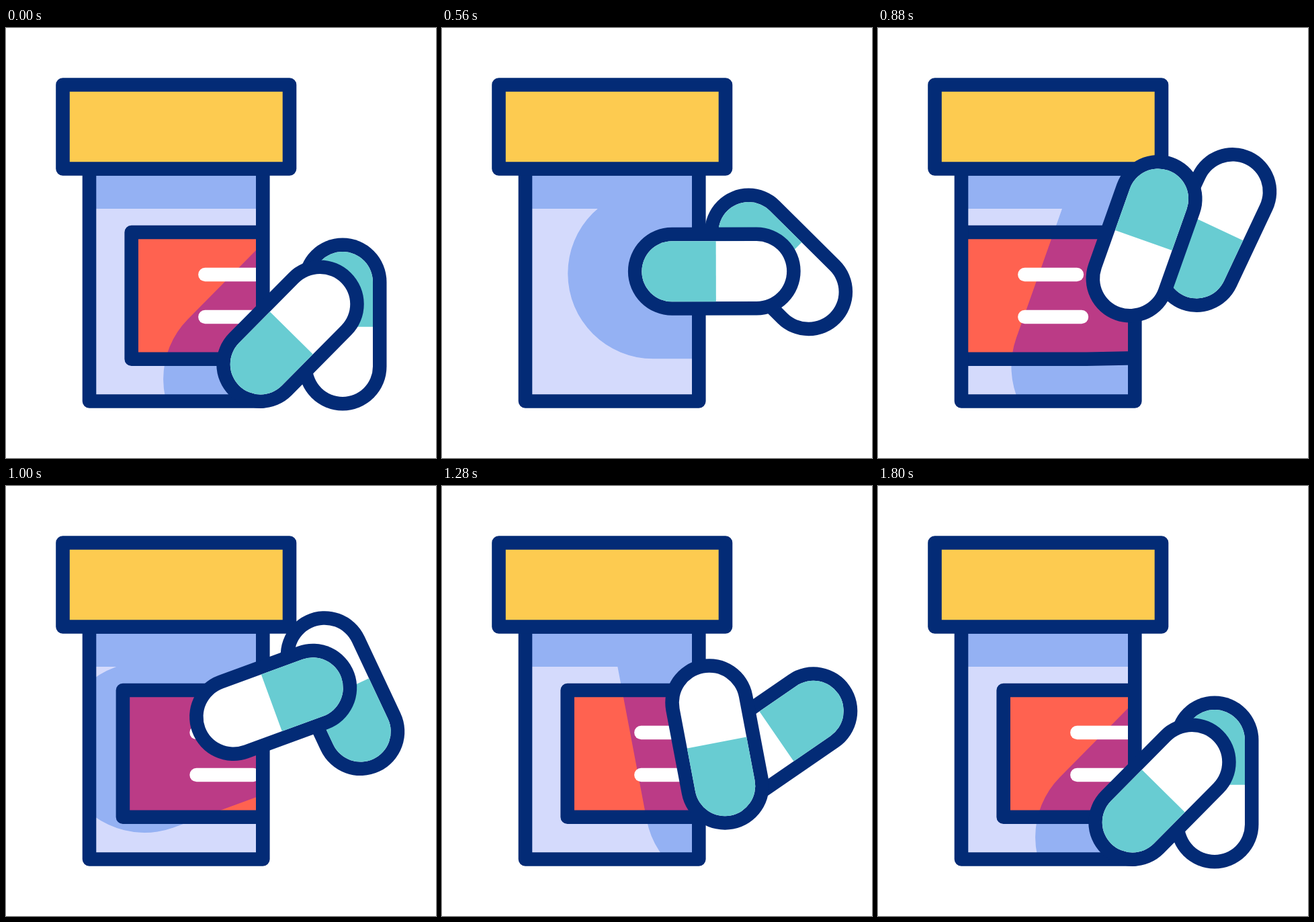
An HTML page with a canvas that plays this animation: 640x640 px, repeating every 2000 ms.

```html
<!DOCTYPE html>
<html lang="en">
<head>
<meta charset="utf-8">
<title>Pill bottle</title>
<style>
  html, body { margin: 0; width: 100%; height: 100%; overflow: hidden; background: #fff; }
  canvas { display: block; width: 640px; height: 640px; }
</style>
</head>
<body>
<canvas id="stage" width="640" height="640"></canvas>
<script>
const ctx = document.getElementById('stage').getContext('2d');
const NAVY = '#032b76', YELLOW = '#fdcb50', RED = '#ff6250', PURPLE = '#bb3b86';
const LIGHT = '#d4dafc', BLUE = '#94b1f3', TEAL = '#68ccd2', WHITE = '#fff';
const LOOP = 2000, START = 160, STEP = 40, LINE = 20.6, RAD = Math.PI / 180;
const HALF = 62.9;

ctx.lineCap = ctx.lineJoin = 'round';

// cubic-bezier(.45, 0, .55, 1)
function ease(p) {
  if (p <= 0) return 0;
  if (p >= 1) return 1;
  let lo = 0, hi = 1, s = 0.5;
  for (let i = 0; i < 24; i++) {
    s = (lo + hi) / 2;
    const x = 1.35 * s * (1 - s) ** 2 + 1.65 * s * s * (1 - s) + s ** 3;
    if (x < p) lo = s; else hi = s;
  }
  return s * s * (3 - 2 * s);
}

const span = (n, from, to) => ease((n - from) / (to - from));

function box(x, y, w, h, color) {
  ctx.fillStyle = color;
  ctx.fillRect(x, y, w, h);
}

function bar(x1, x2, y, width, color) {
  ctx.lineWidth = width;
  ctx.strokeStyle = color;
  ctx.beginPath();
  ctx.moveTo(x1, y);
  ctx.lineTo(x2, y);
  ctx.stroke();
}

function outline(path) {
  ctx.lineWidth = LINE;
  ctx.strokeStyle = NAVY;
  ctx.stroke(path);
}

function scoped(draw) {
  ctx.save();
  draw();
  ctx.restore();
}

function place(pose) {
  ctx.translate(pose.x, pose.y);
  ctx.rotate(pose.angle * RAD);
}

function capsule(pose, split) {
  scoped(() => {
    place(pose);
    bar(-HALF, HALF, 0, 131, NAVY);
    bar(-HALF, HALF, 0, 90, WHITE);
    ctx.fillStyle = TEAL;
    ctx.beginPath();
    ctx.moveTo(split, -45);
    ctx.arc(-HALF, 0, 45, -Math.PI / 2, Math.PI / 2, true);
    ctx.lineTo(split, 45);
    ctx.fill();
  });
}

function shadow(pose, color) {
  scoped(() => {
    place(pose);
    bar(-91, 203, 3, 254, color);
  });
}

const lid = new Path2D('M84.5 84.5H422V209.5H84.5Z');
const body = new Path2D('M124 209.5H382.3V555.5H124Z');
const label = new Path2D('M186.7 304H526V490L388 492.7H186.7Z');
const inside = new Path2D('M124 209.5H382.3V555.5H124Z');

// Leaves on the right, comes back in from the left
function labelShift(n) {
  if (n <= 0 || n >= 23) return 0;
  return n < 11 ? 3.07 * (n + 0.2) ** 2 : -3.07 * (23.04 - n) ** 2;
}

function drawLabel(shift, front) {
  scoped(() => {
    ctx.translate(shift, 0);
    ctx.fillStyle = RED;
    ctx.fill(label);
    scoped(() => {
      ctx.clip(label);
      ctx.translate(-shift, 0);
      shadow(front, PURPLE);
    });
    outline(label);
    bar(296.3, 374, 367, 20.4, WHITE);
    bar(296.3, 381, 430, 20.4, WHITE);
  });
}

function draw(n) {
  const turn = 360 * span(n, 0.1, 38.9);
  const lift = n < 17 ? span(n, 0, 17) : 1 - span(n, 17, 39);
  const front = { x: 423 - 27 * lift, y: 455.7 - 142.5 * lift, angle: turn - 45.3 };
  const back = { x: 501, y: 441 - 141 * lift, angle: 90 - turn };

  box(0, 0, 640, 640, WHITE);
  scoped(() => {
    ctx.clip(inside);
    box(124, 209, 259, 347, LIGHT);
    shadow(front, BLUE);
    box(124, 209, 259, 60, BLUE);
    drawLabel(labelShift(n), front);
  });
  outline(body);
  ctx.fillStyle = YELLOW;
  ctx.fill(lid);
  outline(lid);
  capsule(back, 3.7);
  capsule(front, 2.5);
}

const begin = performance.now();

function tick() {
  const t = (performance.now() - begin) % LOOP;
  // Small lead keeps the steps stable at their boundaries
  draw(Math.max(0, Math.floor((t - START + 6) / STEP)));
  requestAnimationFrame(tick);
}
tick();
</script>
</body>
</html>
```
